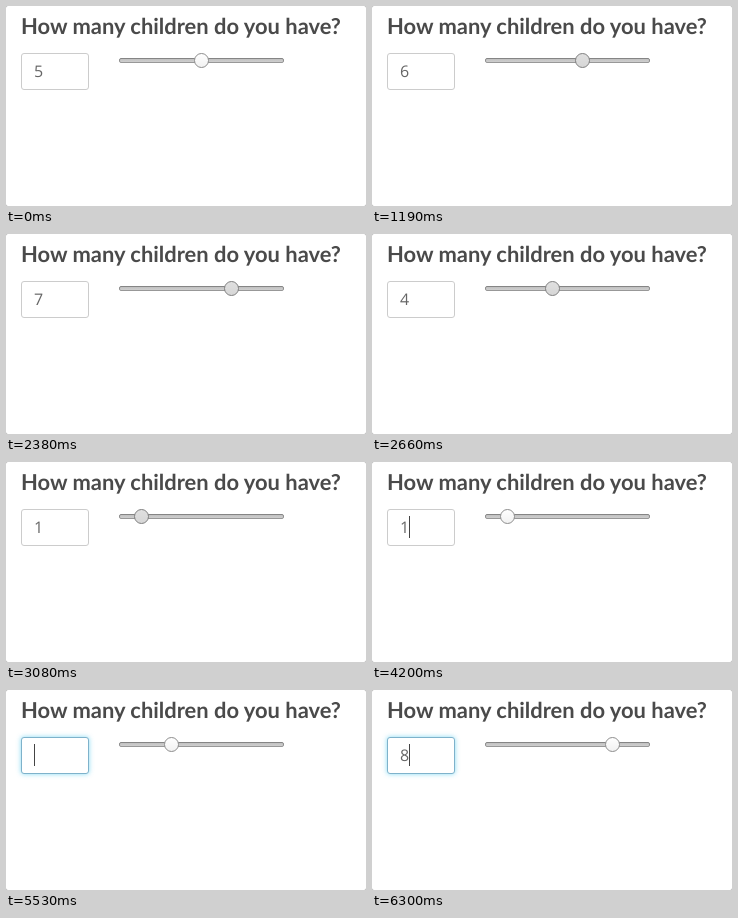
These frames come from a looping animation (360 px wide and 200 px high, 6.72 s). An HTML page:

```html
<!DOCTYPE html>
<html lang="en">
<head>
<meta charset="utf-8">
<title>Slider with number field</title>
<style>
  html, body { margin: 0; width: 100%; height: 100%; overflow: hidden; background: #aaa; }
  #stage { position: absolute; left: 0; top: 0; width: 360px; height: 200px; background: #fff; border-radius: 2px; overflow: hidden; }
  #field { position: absolute; left: 15px; top: 47px; width: 66px; height: 35px; border: 1px solid #ccc; border-radius: 3px; background: #fff; }
  svg { position: absolute; left: 0; top: 0; }
  .title { font: 700 21.93px Lato, sans-serif; fill: #4a4a4a; text-rendering: geometricPrecision; }
  .value { font: 16px "Open Sans", sans-serif; fill: #666; text-rendering: geometricPrecision; }
</style>
</head>
<body>
<div id="stage">
  <div id="field"></div>
  <svg width="360" height="200" viewBox="0 0 360 200">
    <defs>
      <linearGradient id="groove" x2="0" y2="1">
        <stop offset="0" stop-color="#bfbfbf"/><stop offset="1" stop-color="#d0d0d0"/>
      </linearGradient>
      <linearGradient id="rim" x2="0" y2="1">
        <stop offset="0" stop-color="#858585"/><stop offset="1" stop-color="#989898"/>
      </linearGradient>
      <linearGradient id="idle" x2="0" y2="1">
        <stop offset="0" stop-color="#fff"/><stop offset="1" stop-color="#f1f1f1"/>
      </linearGradient>
      <linearGradient id="pressed" x2="0" y2="1">
        <stop offset="0" stop-color="#e0e0e0"/><stop offset="1" stop-color="#d6d6d6"/>
      </linearGradient>
    </defs>
    <text class="title" x="15" y="28.3">How many children do you have?</text>
    <text class="value" id="value" x="28" y="71"></text>
    <rect id="caret" y="54" width="1" height="22" fill="#444"/>
    <rect x="113.5" y="52.5" width="164" height="4" rx="1.5" fill="url(#groove)" stroke="url(#rim)"/>
    <circle id="thumb" cy="54.5" r="7"/>
  </svg>
</div>
<script>
  const LOOP = 6720;
  const el = id => document.getElementById(id);
  const field = el('field'), value = el('value'), caret = el('caret'), thumb = el('thumb');

  // [start in ms, value]
  const slider = [
    [0, 5], [1190, 6], [1260, 7], [1540, 8], [1680, 9], [1890, 10],
    [2240, 9], [2310, 8], [2380, 7], [2520, 6], [2590, 5], [2660, 4],
    [2800, 3], [2940, 2], [3080, 1], [4900, 3], [6300, 8]
  ];
  const glow = [[0, 0], [4340, 0.5], [4410, 1]];

  const at = (steps, t) => steps.reduce((v, [start, next]) => t >= start ? next : v, 0);
  const within = (t, from, to) => t >= from && t < to;
  const mix = (a, b, k) => Math.round(a + (b - a) * k);

  function draw(t) {
    const n = at(slider, t);
    const pressed = within(t, 490, 3640);
    const empty = within(t, 4410, 4900) || within(t, 5530, 6300);
    const focus = at(glow, t);

    value.textContent = empty ? '' : n;
    caret.setAttribute('x', empty ? 28 : 37);
    caret.setAttribute('visibility', t >= 4200 ? 'visible' : 'hidden');

    thumb.setAttribute('cx', 120.5 + 15 * n);
    thumb.setAttribute('fill', pressed ? 'url(#pressed)' : 'url(#idle)');
    thumb.setAttribute('stroke', pressed ? '#808080' : '#8e8e8e');

    field.style.borderColor = `rgb(${mix(204, 126, focus)},${mix(204, 178, focus)},${mix(204, 203, focus)})`;
    field.style.boxShadow = focus ? `0 0 5px rgba(81,203,238,${0.7 * focus})` : 'none';
  }

  const start = performance.now();
  function tick() {
    draw((performance.now() - start) % LOOP);
    requestAnimationFrame(tick);
  }
  tick();
</script>
</body>
</html>
```
